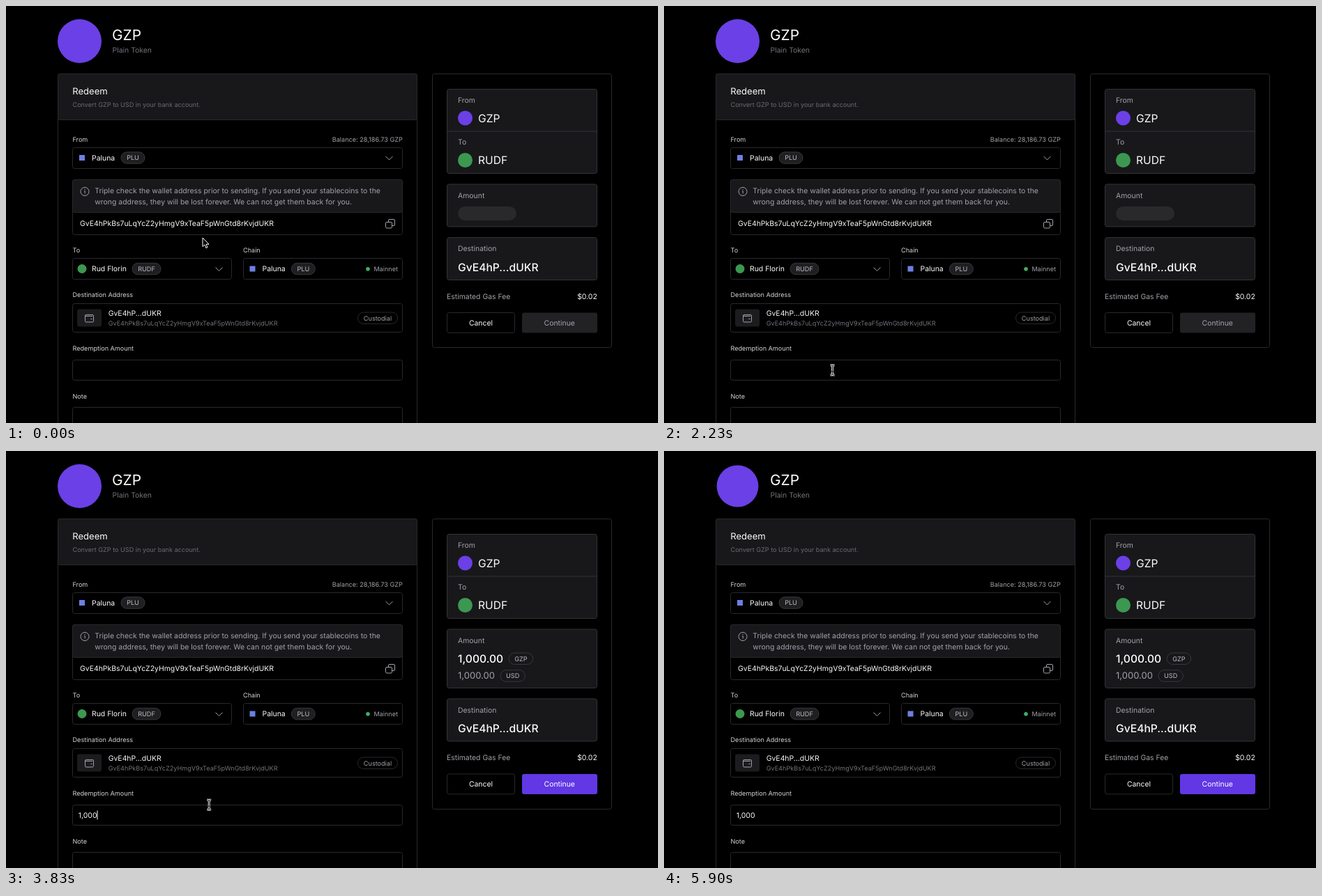
These frames come from a looping animation (935x599 px, 5.93 s). An HTML page:

```html
<!DOCTYPE html>
<html lang="en">
<head>
<meta charset="utf-8">
<title>Redeem</title>
<style>
html, body { margin: 0; width: 100%; height: 100%; overflow: hidden; background: #000; }
svg { display: block; width: 935px; height: 599px; }
text {
  font-family: Inter, "Liberation Sans", sans-serif;
  font-optical-sizing: none;
  text-rendering: geometricPrecision;
}
</style>
</head>
<body>
<svg id="stage" viewBox="0 0 935 599"></svg>
<script>
const LOOP = 5930;
const WHITE = '#fafafa', LIGHT = '#d4d4d8', GREY = '#a1a1aa', DIM = '#71717a';
const LINE = '#29292c', EDGE = '#333338', PANEL = '#18181b', VIOLET = '#6b40e6', GREEN = '#3c9850';
// the page is shown at 65.2 % of its layout size
const [S, M, L, XL, XXL] = [14, 16, 20, 24, 32].map(px => px * 0.652);

const COIN = 'GZP', CHAIN = 'Paluna', CHAIN_TAG = 'PLU', FIAT = 'Rud Florin', FIAT_TAG = 'RUDF';
const HEAD = 'GvE4hP', TAIL = 'dUKR';
const ADDRESS = HEAD + 'kBs7uLqYcZ2yHmgV9xTeaF5pWnGtd8rKvj' + TAIL;
const SHORT = HEAD + '...' + TAIL;

const text = (x, y, s, size, fill, extra = '') =>
  `<text x="${x}" y="${y}" font-size="${size}" fill="${fill}" ${extra}>${s}</text>`;
const rect = (x, y, w, h, fill = 'none', stroke = LINE, rx = 3, extra = '') =>
  `<rect x="${x}" y="${y}" width="${w}" height="${h}" rx="${rx}" fill="${fill}" stroke="${stroke}" ${extra}/>`;
const disc = (x, y, r, fill, extra = '') => `<circle cx="${x}" cy="${y}" r="${r}" fill="${fill}" ${extra}/>`;
const path = (d, stroke = GREY, extra = '') => `<path d="${d}" fill="none" stroke="${stroke}" ${extra}/>`;
const mid = 'text-anchor="middle"', end = 'text-anchor="end"', bold = 'font-weight="500"';

const pill = (x, y, w, s, fill = '#1f1f22', stroke = '#38383d', color = '#bcbcc2') =>
  rect(x, y, w, 16.5, fill, stroke, 8.25) + text(x + w / 2, y + 11.6, s, S, color, mid);
const chevron = (x, y) => path(`M${x - 5} ${y - 2.5}l5 5l5 -5`);
const chainMark = (x, y) => rect(x, y, 8, 8, '#6f7fe0', 'none', 0);

const left =
  disc(105.5, 50.5, 31.5, VIOLET, 'id="logo"') +
  text(152, 49, COIN, XXL, '#fff') +
  text(152.5, 67.3, 'Plain Token', M, DIM) +
  rect(74.5, 97.5, 515, 520) +
  rect(74.5, 97.5, 515, 66, PANEL) +
  text(95.3, 127.3, 'Redeem', L, WHITE) +
  text(95.5, 144.5, `Convert ${COIN} to USD in your bank account.`, S, '#696972') +

  text(95.5, 194.6, 'From', S, LIGHT) +
  text(568.8, 194.6, `Balance: 28,186.73 ${COIN}`, S, GREY, end) +
  rect(95.5, 203.5, 473, 30) + chainMark(105, 214) +
  text(123, 221.8, CHAIN, M, WHITE) + pill(165, 209.8, 34, CHAIN_TAG) + chevron(549.5, 218.5) +

  rect(95.5, 249.5, 473, 79) + rect(95.5, 249.5, 473, 47, PANEL) +
  disc(113, 266.5, 6, 'none', `stroke="${GREY}"`) + path('M112 265.8h1.2v3.6M113 263v1.1') +
  text(127.3, 268.8, 'Triple check the wallet address prior to sending. If you send your stablecoins to the', M, GREY) +
  text(127.3, 284.5, 'wrong address, they will be lost forever. We can not get them back for you.', M, GREY) +
  text(106, 316, ADDRESS, M, WHITE) +
  rect(548.5, 306.5, 9, 9, 'none', GREY, 1.5) + rect(544.5, 310.5, 9, 8.5, '#000', GREY, 1.5) +

  text(95.5, 353.8, 'To', S, LIGHT) + text(340, 353.8, 'Chain', S, LIGHT) +
  rect(95.5, 362.5, 228, 30) + disc(109, 377.5, 6.5, GREEN) +
  text(123, 381.3, FIAT, M, WHITE) + pill(181, 369.3, 41, FIAT_TAG) + chevron(305.5, 378) +
  rect(340.5, 362.5, 228, 30) + chainMark(349.5, 373.5) +
  text(367.5, 381.3, CHAIN, M, WHITE) + pill(409.3, 369.3, 34, CHAIN_TAG) +
  disc(519, 377.8, 2.8, '#3fb068') + text(562, 381, 'Mainnet', S, GREY, end) +

  text(95.5, 418.3, 'Destination Address', S, LIGHT) +
  rect(95.5, 427.5, 473, 41) + rect(102, 435.5, 35, 25, '#1c1c1f', 'none') +
  rect(113.5, 443.5, 12, 10.5, 'none', GREY, 1.5) + path('M114 445.5h10M121.5 449.5h2') +
  text(146.7, 445.2, SHORT, M, WHITE) + text(146.7, 459.2, ADDRESS, S, DIM) +
  pill(504.5, 440, 57, 'Custodial', 'none', LINE, GREY) +

  text(95.5, 495, 'Redemption Amount', S, LIGHT) +
  rect(95.5, 508.5, 473, 29, 'none', LINE, 3, 'id="field"') +
  text(103.8, 527, '', M, WHITE, 'id="typed"') +
  '<rect id="caret" y="516.5" width="1" height="13" fill="#fff"/>' +
  text(95.5, 563.5, 'Note', S, LIGHT) + rect(95.5, 576.5, 473, 50);

const right =
  rect(611.5, 97.5, 257, 393, 'none', LINE, 3, 'id="side"') +
  rect(632.5, 119.5, 215, 121, PANEL, EDGE) + path('M633 180h214', EDGE) +
  text(648, 138.8, 'From', M, GREY) + disc(658.5, 161, 10.5, VIOLET) + text(677, 166.6, COIN, XL, WHITE) +
  text(648, 199.3, 'To', M, GREY) + disc(658.5, 221.5, 10.5, GREEN) + text(677, 227.1, FIAT_TAG, XL, WHITE) +
  rect(632.5, 256, 215, 61, PANEL, EDGE, 3, 'id="amountBox"') +
  text(648, 275.6, 'Amount', M, GREY) +
  rect(648, 288, 84, 20, '#29292c', 'none', 10, 'id="skeleton"') +
  '<g id="amounts">' +
    text(648, 303.6, '', XL, '#fff', bold + ' id="big"') +
    text(648, 327.4, '', L, GREY, 'id="small"') +
    `<g id="bigPill">${pill(0, 290, 34.5, COIN, 'none')}</g>` +
    `<g id="smallPill">${pill(0, 314.7, 35.5, 'USD', 'none')}</g>` +
  '</g>' +
  '<g id="lower">' +
    rect(632.5, 332.5, 215, 61, PANEL, EDGE) +
    text(648, 352.3, 'Destination', M, GREY) + text(648, 380.5, SHORT, XL, WHITE, bold) +
    text(632, 420.5, 'Estimated Gas Fee', M, GREY) + text(847.8, 420.5, '$0.02', M, WHITE, end) +
    rect(632.5, 440.5, 97, 29) + text(681, 459, 'Cancel', M, WHITE, mid) +
    rect(740, 440.5, 108, 29, '#222225', 'none', 3, 'id="go"') +
    text(793.7, 459, 'Continue', M, GREY, mid + ' id="goText"') +
  '</g>';

const beam = 'M-3 -7h1.5q1.5 0 1.5 1.5v11q0 1.5 -1.5 1.5H-3M3 -7h-1.5q-1.5 0 -1.5 1.5M0 5.5q0 1.5 1.5 1.5H3M-1.5 2h3';
const pointer =
  '<g id="arrow"><path d="M0 0V12.6L2.9 9.9L4.9 14.6L7 13.7L5 9.2H9Z" fill="#000" stroke="#fff" stroke-linejoin="round"/></g>' +
  `<g id="ibeam">${path(beam, '#fff', 'stroke-width="2.8"')}${path(beam, '#000', 'stroke-width="1"')}</g>` +
  '<g id="hand"><path d="M-1.7 4.5V-2q0 -1.1 1 -1.1t1 1.1V1.4q1.4 -.7 2 .4q1.4 -.5 1.9 .6q1.7 -.3 1.7 1.3' +
  'v2.6q0 1.4 -1 2.6v1.3H-.9V9Q-2.6 7.4 -4 4.6q-.5 -1.1 .4 -1.3q.8 -.1 1.9 1.2Z" ' +
  'fill="#fff" stroke="#000" stroke-width=".8"/>' + path('M1.2 5.5v2.7M3 5.5v2.7', '#000', 'stroke-width=".6"') + '</g>';

const stage = document.getElementById('stage');
stage.innerHTML = left + right + pointer;
const el = {};
stage.querySelectorAll('[id]').forEach(n => el[n.id] = n);
const set = (n, name, v) => n.setAttribute(name, v);
const show = (n, on) => set(n, 'visibility', on ? 'visible' : 'hidden');

// time, x, y of the pointer
const track = [
  [0, 282, 333], [300, 272, 390], [570, 262, 440], [930, 251, 486.5], [1200, 245, 507],
  [1300, 241.5, 523], [1470, 241.5, 523], [1740, 243, 537], [2000, 241.5, 523], [3560, 241.5, 523],
  [3870, 300, 506], [4300, 403.5, 488.5], [4700, 590, 483], [5070, 784, 478],
  [5200, 784, 478], [5480, 856, 480], [LOOP, 856, 480]
];

function slope(i, k) {
  const a = track[i - 1], b = track[i], c = track[i + 1];
  if (!a || !c) return 0;
  const p = (b[k] - a[k]) / (b[0] - a[0]), q = (c[k] - b[k]) / (c[0] - b[0]);
  return p * q > 0 ? 2 * p * q / (p + q) : 0;
}

function along(t, k) {
  let i = 0;
  while (i < track.length - 2 && t >= track[i + 1][0]) i++;
  const a = track[i], b = track[i + 1], d = b[0] - a[0], u = (t - a[0]) / d, v = 1 - u;
  return a[k] * v * v * (1 + 2 * u) + b[k] * u * u * (3 - 2 * u) +
    d * u * v * (v * slope(i, k) - u * slope(i + 1, k));
}

const latest = (steps, t) => steps.reduce((s, [at, v]) => t >= at ? v : s, '');
const typing = [[2670, '1'], [2830, '10'], [2970, '100'], [3110, '1,000']];
const totals = [[2700, '1.00'], [2870, '10.00'], [3030, '100.00'], [3480, '1,000.00']];

const dip = (t, from, to) => t > from && t < to ? Math.sin(Math.PI * (t - from) / (to - from)) : 0;

function draw(t) {
  set(el.logo, 'r', 31.5 - 1.6 * (dip(t, 1470, 2030) + dip(t, 3430, 3830) + dip(t, 5770, 6040)));

  const typed = latest(typing, t), total = latest(totals, t), ready = total !== '';
  el.typed.textContent = typed;
  show(el.caret, t >= 2500 && t < 5480);
  set(el.caret, 'x', 103.8 + (typed ? el.typed.getComputedTextLength() : 0));
  set(el.field, 'stroke', t >= 2700 && t < 3500 ? '#87403f' : LINE);

  const shift = ready ? 23.4 : 0;
  set(el.side, 'height', ready ? 417 : 393);
  set(el.amountBox, 'height', 61 + shift);
  set(el.lower, 'transform', `translate(0 ${shift})`);
  show(el.skeleton, !ready);
  set(el.amounts, 'display', ready ? 'inline' : 'none');
  if (ready) {
    for (const k of ['big', 'small']) {
      el[k].textContent = total;
      set(el[k + 'Pill'], 'transform', `translate(${656 + el[k].getComputedTextLength()} 0)`);
    }
  }

  const x = along(t, 1), y = along(t, 2);
  const inside = (x0, y0, x1, y1) => x >= x0 && x <= x1 && y >= y0 && y <= y1;
  const seen = t < 2600 || t >= 3560 && t < 5490;
  const overGo = seen && inside(740, 464, 848, 494);
  const kind = overGo || inside(632, 464, 730, 494) ? 'hand' : inside(95, 508, 569, 538) ? 'ibeam' : 'arrow';
  for (const k of ['arrow', 'ibeam', 'hand']) {
    show(el[k], seen && k === kind);
    set(el[k], 'transform', `translate(${x} ${y})`);
  }
  set(el.go, 'fill', !ready ? '#222225' : overGo ? '#7657f0' : '#6138e4');
  set(el.goText, 'fill', ready ? '#fff' : GREY);
}

const start = performance.now();
function tick() {
  draw((performance.now() - start) % LOOP);
  requestAnimationFrame(tick);
}
tick();
</script>
</body>
</html>
```
